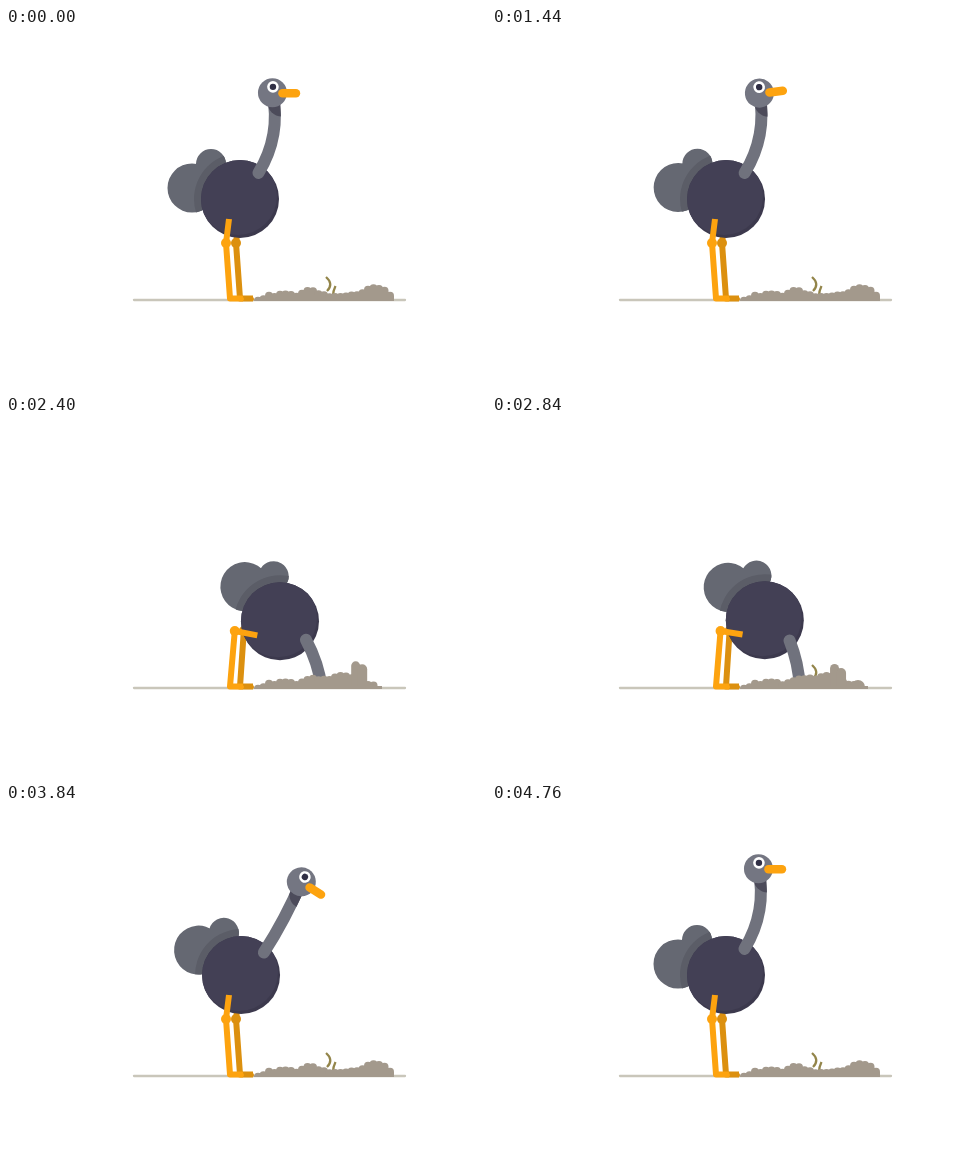
Recreate the animation shown at these times as an HTML page with a canvas. Size 480x360 px, loop 4800 ms.

```html
<!DOCTYPE html>
<html lang="en">
<head>
<meta charset="utf-8">
<title>Ostrich</title>
<style>
html, body { margin: 0; width: 100%; height: 100%; overflow: hidden; background: #fff; }
canvas { display: block; width: 480px; height: 360px; }
</style>
</head>
<body>
<canvas id="stage" width="480" height="360"></canvas>
<script>
const ctx = document.getElementById('stage').getContext('2d');
const LOOP = 4800, RAD = Math.PI / 180, GROUND = 272;
const ORANGE = '#fda30f', DARK_ORANGE = '#dc900f', DIRT = '#a3998c', GRASS = '#93854a';
const NECK = '#70727d', DIVE = 1600, PULL_OUT = 2960, BURST = 3060;

const clamp = (v, low = 0, high = 1) => Math.max(low, Math.min(high, v));
const mix = (a, b, k) => a + (b - a) * k;
const ramp = (t, a, b) => { const k = clamp((t - a) / (b - a)); return k * k * (3 - 2 * k); };
const random = seed => { const v = Math.sin(seed * 12.9898) * 43758.5453; return v - Math.floor(v); };
const hill = (x, center, width) => Math.exp(-(((x - center) / width) ** 2));

// The swing of the head around the body, in degrees from standing, drives the whole pose
function poseAt(t) {
  const buried = ramp(t, DIVE, 1955) * (1 - ramp(t, PULL_OUT, 3300));
  const pull = t > 1960 && t < 3120 ? Math.sin((t - 1960) / 580 * Math.PI) ** 2 : 0;
  const lift = ramp(t, 700, 1000) * (1 - ramp(t, 1580, 1680));
  const swing = 136 * ramp(t, DIVE, 1955) - 184 * ramp(t, PULL_OUT, 3240) +
    64 * ramp(t, 3300, 3800) - 16 * ramp(t, 3800, 4640) + 11 * pull + 0.5 * lift;

  const crouch = buried - 0.05 * pull;
  const tilt = (swing > 0 ? 34 : 11) * Math.tanh(swing / 28) - 5 * pull;
  const body = { x: 234 + 39 * crouch + 0.06 * tilt, y: 171 + 35 * crouch };
  const around = (angle, r) => ({
    x: body.x + r * Math.cos(angle * RAD), y: body.y + r * Math.sin(angle * RAD)
  });
  const headAngle = swing - 73;
  return {
    body, tilt, pull, crouch,
    base: around(0.64 * headAngle - 8, 32),
    head: around(headAngle, 111 + 0.33 * Math.min(0, swing)),
    nod: Math.min(90, 2 * swing) - 8 * lift,
    bow: clamp(16 - 0.8 * swing, -14, 22)
  };
}

function circle(x, y, r, color) {
  ctx.beginPath();
  ctx.arc(x, y, r, 0, 7);
  ctx.fillStyle = color;
  ctx.fill();
}

function stroke(width, color, cap) {
  ctx.lineWidth = width;
  ctx.strokeStyle = color;
  ctx.lineCap = cap;
  ctx.lineJoin = 'round';
  ctx.stroke();
}

function line(points, width, color, cap = 'butt') {
  ctx.beginPath();
  points.forEach(([x, y]) => ctx.lineTo(x, y));
  stroke(width, color, cap);
}

function curve(x, y, cx, cy, ex, ey, width, color, cap = 'butt') {
  ctx.beginPath();
  ctx.moveTo(x, y);
  ctx.quadraticCurveTo(cx, cy, ex, ey);
  stroke(width, color, cap);
}

function layer(x, y, turn, draw) {
  ctx.save();
  ctx.translate(x, y);
  ctx.rotate(turn);
  draw();
  ctx.restore();
}

function drawLeg(kneeX, ankleX, hipX, hipY, color) {
  line([[kneeX, 215], [hipX, hipY]], 6, color);
  line([[kneeX, 215], [ankleX, 270.5], [ankleX + 13, 270.5]], 6, color);
  line([[ankleX + 11, 271], [ankleX + 12, 271]], 4, color, 'round');
  circle(kneeX, 215, 5, color);
}

function drawBody({ body: { x, y }, tilt }) {
  layer(x, y, tilt * RAD, () => {
    const feathers = new Path2D();
    feathers.arc(-48, -11, 24.5, 0, 7);
    feathers.closePath();
    feathers.moveTo(-14, -35);
    feathers.arc(-29, -35, 15, 0, 7);
    ctx.fillStyle = '#656872';
    ctx.fill(feathers);
    ctx.clip(feathers);
    circle(0, 0, 46, '#5b5d67');
  });
  circle(x, y, 39, '#3c394d');
  ctx.save();
  ctx.clip();
  circle(x - 2, y - 3, 39, '#434055');
  ctx.restore();
}

function drawNeckAndHead({ base, head, nod, bow }) {
  const dx = head.x - base.x, dy = head.y - base.y, length = Math.hypot(dx, dy);
  const bendX = base.x + dx / 2 - dy / length * bow;
  const bendY = base.y + dy / 2 + dx / length * bow;
  const neck = color => curve(base.x, base.y, bendX, bendY, head.x, head.y, 12, color, 'round');
  ctx.save();
  ctx.beginPath();
  ctx.rect(0, 0, 480, 271);
  ctx.clip();
  neck(NECK);

  // Shadow of the head, kept inside the neck
  const down = Math.atan2(bendY - head.y, bendX - head.x);
  ctx.save();
  ctx.beginPath();
  ctx.arc(head.x + 13 * Math.cos(down - 0.6), head.y + 13 * Math.sin(down - 0.6), 14.5, 0, 7);
  ctx.clip();
  neck('#4c4b5a');
  ctx.restore();

  layer(head.x, head.y, nod * RAD, () => {
    circle(0, 0, 14.5, '#747682');
    line([[10, 0.5], [23.5, 0.5]], 8.5, ORANGE, 'round');
    circle(0.5, -6, 5.8, '#fff');
    circle(0.5, -6, 3.2, '#302f45');
  });
  ctx.restore();
}

function drawDirt(t, pull) {
  const dug = ramp(t, 1860, 1950) * (1 - ramp(t, 3000, 3140));
  const pile = (x, r, height) =>
    height > 0.5 && line([[x, 290], [x, GROUND - height + r]], r * 2, DIRT, 'round');
  ctx.save();
  ctx.beginPath();
  ctx.rect(0, 0, 480, 273);
  ctx.clip();
  for (let x = 252; x < 387; x += 5.5) {
    const edge = clamp((x - 243) / 18);
    const low = edge * (5 + 2.5 * random(x)) + 3 * hill(x, 276, 12) +
      7 * hill(x, 306 + 4 * pull * dug, 10);
    const rest = low + 9.5 * hill(x, 368, 15);
    const heap = x < 372 ? low + 9 * hill(x, 336, 16) : 0;
    pile(x, 4, mix(rest, heap, dug));
  }
  const ridge = 359.5 - 13.5 * pull;
  pile(ridge - 3.5, 4.5, mix(29, 24, pull) * dug);
  pile(ridge + 3, 5, mix(27, 20, pull) * dug);
  pile(366, 7, 8 * pull * dug);
  line([[250, 271.5], [mix(388, 376, dug), 271.5]], 3, DIRT);
  ctx.restore();
}

function drawGrass(t) {
  const age = t - BURST, flat = ramp(t, 1860, 1920);
  const tall = 1 - flat + ramp(t, 2600, 2800), short = 1 - flat + ramp(t, BURST, BURST + 100);
  const sway = age > 0 ? 4 * Math.exp(-age / 200) * Math.sin(age / 60) : 0;
  if (tall > 0.02) curve(321, 263, 328 + sway, 263 - 7 * tall, 320 + sway, 263 - 14 * tall, 2.3, GRASS);
  if (short > 0.02) curve(327, 268, 327, 268 - 5 * short, 329.5, 268 - 10 * short, 2.3, GRASS);
  if (age > 0 && age < 490) {
    layer(322 + 0.09 * age, 255 - 1.495 * age + 0.003 * age * age, (age - 180) / 150, () =>
      curve(-4, -5, 3, -4, 4, 5, 2, GRASS));
  }
}

// One big clod and a fan of crumbs thrown up as the head comes free
function drawClods(t) {
  const age = t - BURST;
  for (let i = 0; i < 8; i++) {
    const big = i === 0;
    if (age < 0 || age > (big ? 470 : 320)) continue;
    const rise = big ? 0.507 : 0.45 + 0.4 * random(i);
    circle(320 + mix(-0.705, 0.3, i / 7) * age, 265 - rise * age + 0.00115 * age * age,
      big ? 4 : 0.8 + 1.2 * random(i + 20), big ? DIRT : '#929198');
  }
}

function draw(t) {
  const pose = poseAt(t), bend = pose.crouch;
  const hipX = 223 + 29 * bend, hipY = 191 + 29 * bend;
  ctx.fillStyle = '#fff';
  ctx.fillRect(0, 0, 480, 360);
  line([[128, GROUND], [399, GROUND]], 2.3, '#c9c6ba', 'round');
  drawLeg(230 + 8 * bend, 234, hipX + 10, hipY, DARK_ORANGE);
  drawBody(pose);
  drawNeckAndHead(pose);
  drawLeg(220 + 9 * bend, 224, hipX, hipY, ORANGE);
  drawGrass(t);
  drawDirt(t, pose.pull);
  drawClods(t);
}

const begin = performance.now();
function tick() {
  draw((performance.now() - begin) % LOOP);
  requestAnimationFrame(tick);
}
tick();
</script>
</body>
</html>
```
